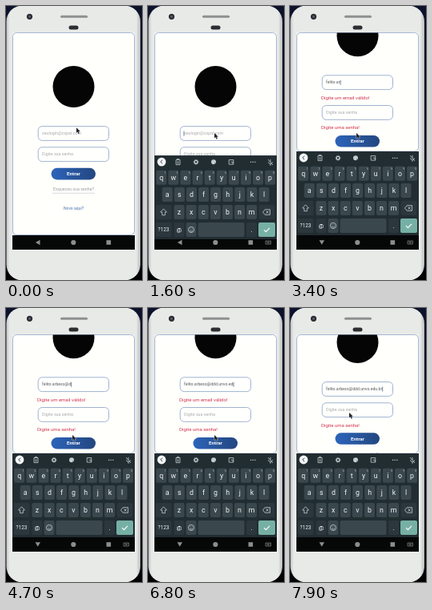
Animation, 170 px wide and 343 px high, one loop 8 s. Source, as an HTML page:

```html
<!DOCTYPE html>
<html lang="pt-BR">
<head>
<meta charset="utf-8">
<title>Login</title>
<style>
html, body { margin: 0; width: 100%; height: 100%; overflow: hidden; background: linear-gradient(#0c122b, #07091a 70%, #020204); }
svg { display: block; width: 170px; height: 343px; }
text { font-family: Roboto, sans-serif; white-space: pre; }
.mid { text-anchor: middle; }
.icon { fill: none; stroke: #c6d0d3; stroke-width: .8; }
.field { fill: #fffffd; stroke: #8aa0c6; stroke-width: .8; }
</style>
</head>
<body>
<svg viewBox="0 0 170 343">
  <defs>
    <linearGradient id="blue"><stop stop-color="#2c64ba"/><stop offset="1" stop-color="#234780"/></linearGradient>
    <linearGradient id="shell"><stop stop-color="#c6c8c9"/><stop offset=".025" stop-color="#e8eae8"/><stop offset=".97" stop-color="#e8eae8"/><stop offset="1" stop-color="#b9bbbd"/></linearGradient>
    <clipPath id="page"><rect id="pageClip" x="8.5" y="33.5" width="152" height="253" rx="5"/></clipPath>
    <clipPath id="screen"><rect x="8" y="33" width="153" height="272"/></clipPath>
  </defs>
  <rect x=".5" y="-.5" width="167.5" height="344" rx="20" fill="url(#shell)"/>
  <circle cx="29.5" cy="13.3" r="3.6" fill="#2b2d33"/>
  <circle cx="29.5" cy="13.3" r="1.4" fill="#596273"/>
  <rect x="68" y="11.7" width="34" height="3" rx="1.5" fill="#8e9091"/>
  <rect x="78.5" y="24.5" width="12" height="5" rx="2.5" fill="#2d2e31"/>
  <rect x="8" y="33" width="153" height="272" fill="#f0f2f2"/>

  <rect id="pageBox" x="8.5" y="33.5" width="152" height="253" rx="5" fill="#fffffc" stroke="#93a8cc" stroke-width=".8"/>
  <g clip-path="url(#page)">
    <g id="top">
      <circle cx="84.5" cy="101" r="26" fill="#050505"/>
      <rect class="field" x="40.2" y="150.6" width="88.3" height="17.8" rx="5"/>
      <text id="mail" x="45" y="161.2"></text>
      <rect id="caret" y="156.6" width=".7" height="6" fill="#34506f"/>
      <text id="mailError" x="39" y="180.8" font-size="6" fill="#d3304c">Digite um email válido!</text>
    </g>
    <g id="middle">
      <rect class="field" x="40.2" y="176.8" width="88.3" height="17.8" rx="5"/>
      <text x="45" y="187.3" font-size="5.3" fill="#a9abae">Digite sua senha</text>
      <text id="passError" x="39" y="206.7" font-size="6" fill="#d3304c">Digite uma senha!</text>
    </g>
    <g id="bottom">
      <rect x="56.5" y="202.8" width="55.5" height="14.6" rx="7.3" fill="url(#blue)"/>
      <text class="mid" x="84.5" y="212.3" font-size="6.2" font-weight="700" fill="#fff">Entrar</text>
      <text class="mid" x="84.5" y="231.2" font-size="5.3" fill="#9a9da2">Esqueceu sua senha?</text>
      <path d="M58 234.3H111" stroke="#c9ccd2" stroke-width=".7"/>
      <text class="mid" x="84.5" y="255" font-size="5.1" fill="#4772ab">Novo aqui?</text>
    </g>
  </g>

  <rect x="8" y="287" width="153" height="18" fill="#060707"/>
  <g clip-path="url(#screen)">
    <g id="keyboard">
      <rect x="8" y="182" width="153" height="105" fill="#222d32"/>
      <rect x="8" y="287" width="153" height="18" fill="#060707"/>
      <circle cx="17" cy="190" r="5.4" fill="#f4f6f6"/>
      <path id="arrow" fill="none" stroke="#35434a"/>
      <g id="tools" class="icon">
        <path d="M35 187.5H40V193.6H35ZM36.3 187.5V186.4H38.7V187.5M36.2 189.9H38.8M36.2 191.7H38.8"/>
        <circle cx="60" cy="190.3" r="1.9" stroke-width="1.3"/>
        <circle cx="60" cy="190.3" r="2.9" stroke-dasharray="1.2 1.08"/>
        <circle cx="82" cy="190.3" r="3" fill="#c6d0d3" stroke="none"/>
        <path d="M80.4 190h.1M81.8 188.7h.1M83.3 190h.1M83 192h1.5" stroke="#222d32"/>
        <path d="M101.2 187.5H106.8V193.1H101.2ZM103.5 190.2H106.2V192.8"/>
        <path d="M128 190.3h1.2M130.6 190.3h1.2M133.2 190.3h1.2" stroke-width="1.2"/>
      </g>
      <g id="hints" class="mid" fill="#f1f4f4">
        <text id="word" x="41.5" y="192.6" font-size="6.2"></text>
        <text x="84" y="189.2" font-size="5.8" font-weight="700">felito.arbeso</text>
        <text x="84" y="195.2" font-size="4.6">@cxpal.com</text>
        <text x="126" y="189.2" font-size="5.8" font-weight="700">felito.arbeso</text>
        <text x="126" y="195.2" font-size="4.6">@ddd.unvo.edu</text>
      </g>
      <g class="icon">
        <path d="M153 186.8V190.5M150.5 190.3Q151 192.8 153 192.8T155.5 190.3M153 193V194.8"/>
        <path d="M150 187L156 194"/>
      </g>
      <g id="keys"></g>
      <g class="icon">
        <path d="M19.5 248.8L15.6 253H17.7V256.7H21.3V253H23.4Z"/>
        <path d="M143.5 253L146.2 249.7H152.5V256.3H146.2ZM147.5 251.3L150.7 254.7M150.7 251.3L147.5 254.7"/>
        <circle cx="54" cy="275" r="3.6"/>
        <path d="M52.6 274h.8M54.8 274h.8M52 276Q54 278.4 56 276"/>
        <path d="M145 275.2L147.4 277.6L152 272.8" stroke="#fff" stroke-width="1.1"/>
      </g>
    </g>
  </g>

  <g fill="#8b8d8f">
    <path id="back"/>
    <circle cx="84.3" cy="296" r="3.1"/>
    <rect x="125.5" y="293.2" width="5.6" height="5.6"/>
    <path id="imeIcon" d="M147 294H153.5V298H147ZM148.3 295.5H152.2M148.8 297H151.7" fill="none" stroke="#8b8d8f" stroke-width=".7"/>
  </g>
  <path id="pointer" d="M0 0V6.4L1.5 5.1L2.7 7.7L3.9 7.1L2.8 4.7H4.8Z" fill="#24262b" stroke="#f0f1f3" stroke-width=".7" paint-order="stroke"/>
</svg>
<script>
const LOOP = 8000;
const STEP = 100;
const EMAIL = 'felito.arbeso@ddd.unvo.edu.br';
const HINT = 'seulogin@cxpal.com';
const VALID = /^\S+@\S+\.[a-z]{2,}$/;

const FOCUS = 1100, SLIDE_START = 1350, SLIDE_END = 1670, RESIZE = 1700, SUBMIT = 2500;
const KEYBOARD_HEIGHT = 106, ERROR_HEIGHT = 11.5;

// time of each typed character, in steps
const TYPED = [19, 20, 22, 24, 25, 26, 30, 31, 34, 36, 37, 37, 39, 42, 47,
  48, 50, 51, 58, 59, 60, 61, 66, 67, 68, 70, 72, 73, 74];

// [start ms, position]
const POINTER = [[0, [88, 152.3]], [100, [87.6, 152]], [600, [83.4, 156]],
  [1000, [83, 159]], [7800, [78, 146]], [7900, [74, 131]]];

const $ = id => document.getElementById(id);
const at = (steps, t) => steps.reduce((v, [start, next]) => t >= start ? next : v, steps[0][1]);
const move = (id, y) => $(id).setAttribute('transform', `translate(0 ${y})`);
const show = (id, on) => $(id).setAttribute('visibility', on ? 'visible' : 'hidden');
const typedAt = t => EMAIL.slice(0, TYPED.filter(s => t >= s * STEP).length);

function add(tag, attrs, label = '') {
  const el = document.createElementNS('http://www.w3.org/2000/svg', tag);
  for (const name in attrs) el.setAttribute(name, attrs[name]);
  el.textContent = label;
  $('keys').append(el);
}

function key(x, y, label, w = 13, fill = '#3a474c', size = 8.8) {
  add('rect', { x: x - w / 2, y: y - 9, width: w, height: 18, rx: 2, fill });
  if (label) add('text', { x, y: y + size * .33, class: 'mid', 'font-size': size, fill: '#f1f4f4' }, label);
}

function buildKeys() {
  const rows = [['qwertyuiop', 16.7, 209.7], ['asdfghjkl', 24.2, 231], ['zxcvbnm', 39, 253]];
  rows.forEach(([letters, x, y], row) => {
    [...letters].forEach((c, i) => {
      key(x + i * 15.1, y, c);
      if (row === 0) add('text', { x: x + i * 15.1 + 4.7, y: y - 5, class: 'mid', 'font-size': 3.4, fill: '#b9c2c6' }, (i + 1) % 10);
    });
  });
  const dark = '#2b373c';
  key(19.5, 253, '', 20, dark);
  key(148.5, 253, '', 20, dark);
  key(19.5, 275, '?123', 20, dark, 6.4);
  key(39, 275, '@', 13, dark, 7.6);
  key(54, 275, '');
  key(91.5, 275, '', 58);
  key(129.5, 275, '.', 13, dark);
  key(148.5, 275, '', 21, '#76b0a5');
}

function renderForm(t, text) {
  // validation runs one step behind the typing
  const passError = t >= SUBMIT ? 1 : 0;
  const mailError = passError && !VALID.test(typedAt(t - STEP)) ? 1 : 0;

  // centred form: it moves up by half of what is added or taken away
  const top = (t >= RESIZE ? -52.3 : 0) - (mailError + passError) * ERROR_HEIGHT / 2;
  const middle = top + mailError * ERROR_HEIGHT;
  move('top', top);
  move('middle', middle);
  move('bottom', middle + passError * ERROR_HEIGHT);
  show('mailError', mailError);
  show('passError', passError);

  const mail = $('mail');
  mail.textContent = text || HINT;
  mail.setAttribute('fill', text ? '#55585c' : '#a9abae');
  mail.setAttribute('font-size', text ? 5.15 : 5.3);
  $('caret').setAttribute('x', 45 + (text ? mail.getComputedTextLength() + .3 : -.4));
  show('caret', t >= FOCUS);

  const height = t >= RESIZE ? 148.5 : 253;
  for (const id of ['pageBox', 'pageClip']) $(id).setAttribute('height', height);
}

function renderKeyboard(t, text) {
  const left = Math.min(1, Math.max(0, (SLIDE_END - t) / (SLIDE_END - SLIDE_START)));
  show('keyboard', left < 1);
  move('keyboard', KEYBOARD_HEIGHT * left * left);

  const hints = t >= 2200 && t < 3400;
  $('tools').style.display = hints ? 'none' : '';
  $('hints').style.display = hints ? '' : 'none';
  $('word').textContent = typedAt(t - STEP);
  $('arrow').setAttribute('d', hints ? 'M16 187.7L18.3 190L16 192.3' : 'M18 187.7L15.7 190L18 192.3');

  $('back').setAttribute('d', t >= RESIZE ? 'M36.5 293.2H43L39.75 298.8Z' : 'M42.5 292.7V299.3L36.8 296Z');
  show('imeIcon', left < 1);
}

function render(time) {
  const t = Math.floor(time / STEP) * STEP;
  const text = typedAt(t);
  renderForm(t, text);
  renderKeyboard(t, text);
  $('pointer').setAttribute('transform', `translate(${at(POINTER, t)})`);
}

function tick() {
  render(performance.now() % LOOP);
  requestAnimationFrame(tick);
}

buildKeys();
tick();
</script>
</body>
</html>
```
